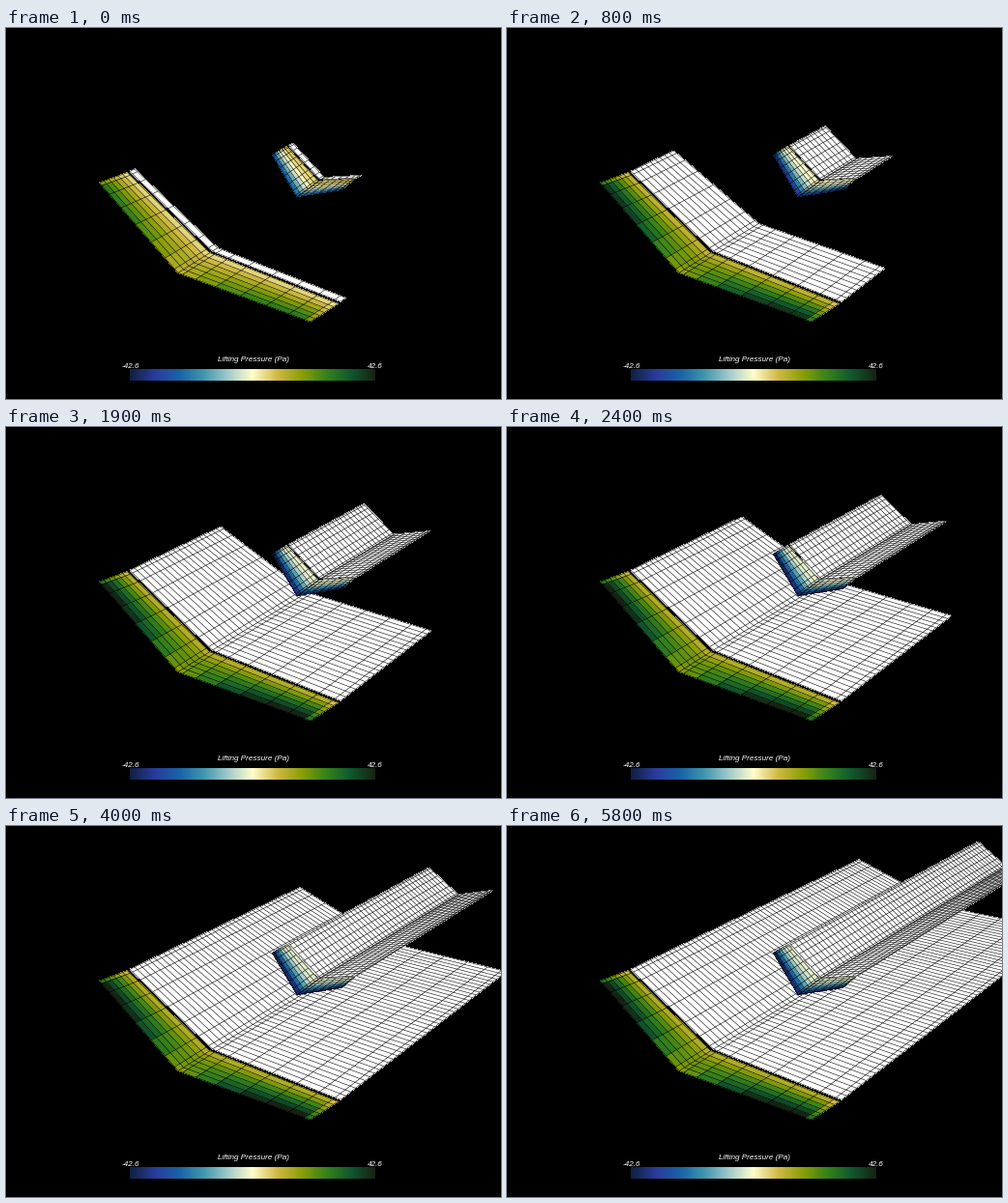
These frames come from a looping animation (512 by 384 pixels, 5900 ms). A matplotlib script:

```python
import numpy as np
import matplotlib.pyplot as plt
from matplotlib.animation import FuncAnimation
from matplotlib.collections import LineCollection, PolyCollection
from matplotlib.colors import LinearSegmentedColormap

W, H, DPI = 512, 384, 100
FRAMES, STEP_MS = 59, 100
PX = 72 / DPI
LIMIT = 42.6
ROWS, COLS = 6, 8
GAP = 0.5  # trailing edge to first wake line, in wake steps

CMAP = LinearSegmentedColormap.from_list("delta", [
    "#112040", "#293b9b", "#1a63a6", "#3f95ae", "#a0cacb", "#fffdcc",
    "#d0b944", "#8a9e06", "#37831a", "#10592f", "#172312"])

# Vanishing point of the free stream, in homogeneous screen coordinates.
STREAM = np.array([1170, -353, 1.0])

# Cosine spacing from root to tip, mirrored for the left half.
span = (1 - np.cos(np.pi * np.arange(COLS + 1) / COLS)) / 2
mid = (span[1:] + span[:-1]) / 2
SPAN = np.concatenate([mid[::-1], mid])
CHORD = np.linspace(0, 1, ROWS)[:, None]


def hom(x, y, w):
    return np.array([x * w, y * w, w])


def spread(left, root, right):
    """Points along a swept edge, from left tip over root to right tip."""
    a = root + np.outer(span[::-1], left - root)
    b = root + np.outer(span[1:], right - root)
    return np.vstack([a, b])


class Mesh:
    """Filled quads with a thin grid drawn once on top."""

    def __init__(self, ax, z):
        self.fill = PolyCollection([], facecolors="white", linewidths=0,
                                   antialiaseds=False, zorder=z)
        self.grid = LineCollection([], colors="black", linewidths=0.55 * PX,
                                   zorder=z + 0.5)
        ax.add_collection(self.fill)
        ax.add_collection(self.grid)

    def shape(self, points):
        p = points[..., :2] / points[..., 2:]
        q = np.stack([p[:-1, :-1], p[:-1, 1:], p[1:, 1:], p[1:, :-1]], axis=2)
        self.fill.set_verts(q.reshape(-1, 4, 2))
        self.grid.set_segments([*p, *p.swapaxes(0, 1)])


class Wing:
    def __init__(self, ax, z, lead, shed, pressure):
        # The leading edge lies upstream, so its depth follows from x.
        far = STREAM[0]
        front = spread(*(hom(x, y, w * (far - sx) / (far - x))
                         for (x, y), (sx, _, w) in zip(lead, shed)))
        self.shed = spread(*(hom(*p) for p in shed))
        rear = self.shed - GAP * STREAM
        self.pressure = pressure
        self.wake, self.body = Mesh(ax, z), Mesh(ax, z + 1)
        t = np.linspace(0, 1, ROWS + 1)[:, None, None]
        self.body.shape(front + t * (rear - front))

    def update(self, n):
        steps = np.arange(n + 2)[:, None, None]
        self.wake.shape(self.shed + steps * STREAM)
        self.body.fill.set_facecolor(CMAP((self.pressure(n).ravel() + 1) / 2))


def settle(first, last, n, tau):
    return last + (first - last) * np.exp(-n / tau)


def main_pressure(n):
    nose = settle(0.64, 1.0, n, 5)
    tail = settle(0.12, 0.29, n, 5)
    chord = nose + (tail - nose) * CHORD
    rise = np.sin(np.pi / 2 * np.minimum(SPAN / 0.8, 1))
    load = 1 - 0.62 * (1 - CHORD) * (1 - rise)
    return chord * load * np.where(SPAN > 0.96, 0.68, 1)


def tail_pressure(n):
    nose = settle(-0.62, -1.0, n, 7)
    tail = settle(0.14, -0.06, n, 7)
    chord = tail + (nose - tail) * (1 - CHORD) ** 2
    return chord * (0.85 + 0.2 * SPAN)


fig = plt.figure(figsize=(W / DPI, H / DPI), dpi=DPI, facecolor="black")
ax = fig.add_axes([0, 0, 1, 1])
ax.set_axis_off()

ax.imshow(np.linspace(0, 1, 256)[None], cmap=CMAP, aspect="auto",
          extent=(128, 382, 365, 353), interpolation="nearest", zorder=20)
ax.set(xlim=(0, W), ylim=(H, 0))


def label(x, y, text):
    ax.text(x, y, text, color="white", ha="center", va="baseline",
            family="Liberation Sans", style="italic", size=8.1 * PX, zorder=20)


label(256, 345, "Lifting Pressure (Pa)")
label(128.5, 351.5, f"{-LIMIT}")
label(382, 351.5, f"{LIMIT}")

# Left tip, root, right tip: leading edge (x, y), wake edge (x, y, depth).
wings = [
    Wing(ax, 1,
         lead=[(96.5, 160), (178, 253.5), (315, 304)],
         shed=[(128, 148.4, 201.6), (213.5, 231, 175.4), (346, 283.3, 155.8)],
         pressure=main_pressure),
    Wing(ax, 5,
         lead=[(275.5, 131.5), (301, 174.5), (347, 167.5)],
         shed=[(292.5, 121.5, 207), (325, 157, 202), (363, 155, 194.2)],
         pressure=tail_pressure),
]


def draw(n):
    for wing in wings:
        wing.update(n)


anim = FuncAnimation(fig, draw, frames=FRAMES, interval=STEP_MS,
                     repeat=True, repeat_delay=0, blit=False)
plt.show()
```
